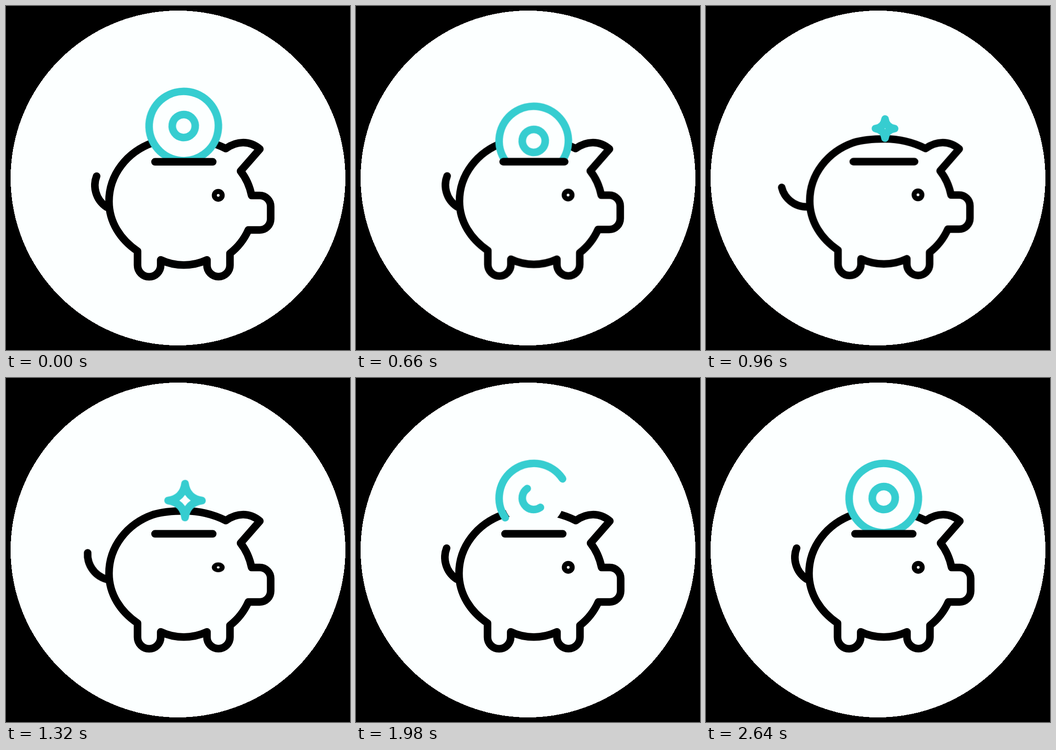
These frames come from a looping animation (748x748 px, 2.7 s). An HTML page:

```html
<!DOCTYPE html>
<html lang="en">
<head>
<meta charset="utf-8">
<title>Piggy bank</title>
<style>
  html, body { margin: 0; width: 100%; height: 100%; overflow: hidden; background: #000; }
  svg { display: block; width: 100vw; height: 100vh; }

  .line { fill: none; stroke: #000; stroke-width: 16.5; stroke-linecap: round; stroke-linejoin: round; }
  .teal { stroke: #36cdd0; }
  .paper { fill: #fcffff; }

  .squeeze, .slot, .tail, .eye, .coin, .disc, .spin, .ring, .star {
    animation: 2700ms linear infinite;
  }
  .squeeze { animation-name: squeeze; transform-origin: 400px 290px; }
  .slot { animation-name: slot; transform-origin: 386.5px 338.8px; }
  .tail { animation-name: wag; transform-origin: 220px 437.5px; animation-timing-function: cubic-bezier(.37, 0, .63, 1); }
  .eye { animation-name: blink; transform-origin: 461.5px 411.7px; animation-timing-function: cubic-bezier(.37, 0, .63, 1); }
  .coin { animation-name: drop; }
  .disc { animation-name: fill-in; }
  .spin { animation-name: spin; }
  .ring { animation-name: draw; }
  .star { animation-name: twinkle; }
  .star path { vector-effect: non-scaling-stroke; }

  @keyframes squeeze {
    0%, 17.778% { transform: scale(1); }
    24.444% { transform: scale(.9945); }
    35.556%, 36.1% { transform: scale(.991); }
    36.11%, 100% { transform: scale(1); }
  }
  @keyframes slot {
    0%, 17.778% { transform: scaleX(1); }
    22.222%, 36.1% { transform: scaleX(1.064); }
    36.11%, 100% { transform: scaleX(1); }
  }
  @keyframes wag {
    0%, 25.556%, 44.444%, 64.444%, 100% { transform: rotate(0deg); }
    35.556%, 53.333% { transform: rotate(-35deg); }
  }
  @keyframes blink {
    0%, 47.778%, 54.444%, 100% { transform: scaleY(1); }
    51.111% { transform: scaleY(.1); }
  }
  @keyframes drop {
    0% { transform: translateY(0); opacity: 1; }
    17.778% { transform: translateY(0); opacity: 1; animation-timing-function: cubic-bezier(.333, 0, .667, .333); }
    32.593% { transform: translateY(158px); opacity: 1; }
    32.6% { transform: translateY(0); opacity: 0; }
    62.215% { transform: translateY(0); opacity: 0; }
    62.222%, 100% { transform: translateY(0); opacity: 1; }
  }
  @keyframes fill-in {
    0%, 32.593% { transform: scale(1); }
    32.6% { transform: scale(0); }
    62.963% { transform: scale(0); animation-timing-function: cubic-bezier(.37, 0, .63, 1); }
    76.296%, 100% { transform: scale(1); }
  }
  @keyframes spin {
    0% { transform: rotate(0deg); }
    62.222% { transform: rotate(0deg); animation-timing-function: cubic-bezier(.37, 0, .63, 1); }
    84.444%, 100% { transform: rotate(360deg); }
  }
  @keyframes draw {
    0%, 32.593% { stroke-dasharray: 100 100; }
    32.6% { stroke-dasharray: 0 100; }
    62.222% { stroke-dasharray: 0 100; animation-timing-function: cubic-bezier(.37, 0, .63, 1); }
    84.444%, 100% { stroke-dasharray: 100 100; }
  }
  @keyframes twinkle {
    0%, 31.47% { transform: scale(0); opacity: 0; }
    31.481% { transform: scale(0); opacity: 1; animation-timing-function: cubic-bezier(.39, .575, .565, 1); }
    42.593% { transform: scale(1); opacity: 1; }
    56.296% { transform: scale(1); opacity: 1; animation-timing-function: cubic-bezier(.37, 0, .63, 1); }
    66.296% { transform: scale(0); opacity: 1; }
    66.3%, 100% { transform: scale(0); opacity: 0; }
  }
</style>
</head>
<body>
<svg viewBox="0 0 748 748">
  <clipPath id="above-slot"><path d="M0 0H748V338.5H0Z"/></clipPath>
  <circle class="paper" cx="374" cy="374" r="364" shape-rendering="crispEdges"/>

  <g class="squeeze">
    <path class="line tail" d="M197 370C189 390 193 420 219 437.5"/>
    <path class="line" d="M478 310C450 296 420 289 388 289C365 289 340 291 320 297
      C263 317 224 367 224 425C224 470 249 508 286 533
      V563.5a25.2 25.2 0 0 0 50.4 0V552C368 567 405 567 437 552
      V563.5a25 25 0 0 0 50 0V538C505 524 518 507 527 487
      H551.5a24 24 0 0 0 24 -24V436a24 24 0 0 0 -24 -24H534
      C530 392 522 374 510 359L552 311C530 292 502 293 478 310Z"/>
    <circle class="line eye" cx="461.5" cy="411.7" r="8.5" style="stroke-width:11px"/>
  </g>

  <g clip-path="url(#above-slot)">
    <g class="coin">
      <g transform="translate(386.5 261)">
        <circle class="paper disc" r="75"/>
        <g class="spin">
          <circle class="line teal ring" r="75.3" pathLength="100" transform="rotate(-35.6)"/>
          <circle class="line teal ring" r="25" pathLength="100" transform="rotate(-126.4)"/>
        </g>
      </g>
    </g>
  </g>

  <g class="squeeze">
    <path class="line slot" d="M324 338.8H449.5"/>
  </g>

  <g transform="translate(389.3 266.5)">
    <g class="star">
      <path class="line teal" d="M0 -36.8Q4.5 -4.5 36.8 0Q4.5 4.5 0 36.8Q-4.5 4.5 -36.8 0Q-4.5 -4.5 0 -36.8Z"/>
    </g>
  </g>
</svg>
</body>
</html>
```
